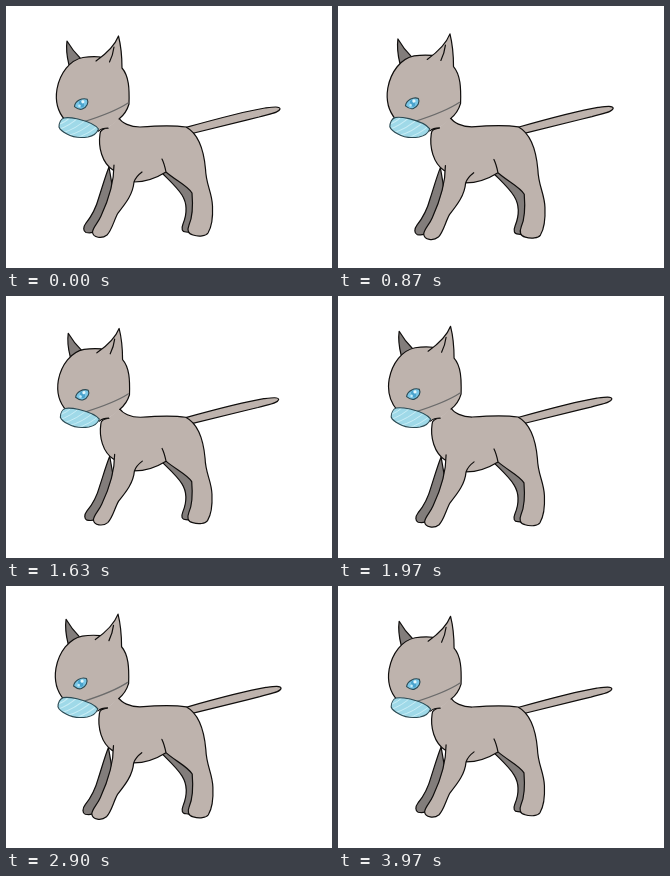
Recreate the animation shown at these times as an HTML page. Size 326x262 px, loop 4010 ms.

```html
<!DOCTYPE html>
<html lang="en">
<head>
<meta charset="utf-8">
<title>Breathing cat</title>
<style>
  html, body { margin: 0; width: 100%; height: 100%; overflow: hidden; background: #fff; }
  svg { display: block; width: 326px; height: 262px; }
  .line { fill: none; stroke: #100e0d; stroke-width: 1.2; stroke-linecap: round; stroke-linejoin: round; }
  .fur { fill: #beb3ad; }
  .shade { fill: #827d7b; }
  .strap { stroke: #6b6b6b; }
  .mask { fill: #9fd9e8; }
  .rim { stroke: #2c4a53; stroke-width: 1.1; }
  .stripes { fill: none; stroke: #c9edf5; stroke-width: 1; }
</style>
</head>
<body>
<svg viewBox="0 0 326 262">
  <defs>
    <path id="maskShape" d="M53 121C53 117 55 113 58 112C62 111 67 112 72 113C80 115 89 118 92.5 123C91 127 87 130 82 131C75 132 66 131 61 128C57 126 54 124 53 121Z"/>
    <clipPath id="maskClip"><use href="#maskShape"/></clipPath>
  </defs>
  <g id="cat">
    <!-- far legs and ear -->
    <path class="line shade" d="M103 161C99 171 96 182 93 191C90 202 85 211 80 217C77 221 77 225 80 226.500C83 227 87 227 89 225L108 190Z"/>
    <path class="line shade" d="M155 166C164 175 171 181 176 189C181 197 181 208 177 218C175 223 176 226 180 226L188 227L190 188L166 160Z"/>
    <path class="line shade" d="M63 59C61 51 60 42 61 35C65 42 69 47 75 53Z"/>

    <!-- tail -->
    <path class="line fur" d="M178 122C203 115 235 106 259 102C267 101 274 100 274 103C273 107 263 108 253 111C229 117 204 123 184 128Z"/>

    <!-- body and near legs -->
    <path class="fur" d="M102 122C97 123 94 124 94 128C92 141 96 157 107 164C108 179 102 195 95 210C92 217 87 221 86.500 226C87 232 96 233 101 229C106 224 108 214 112 207C120 197 127 188 128 176C140 176 152 171 160 166C169 174 182 180 186 187C187 199 187 210 183 219C181 224 182 228 187 229C193 231 200 230 202 227C205 222 207 211 206.500 200C206 186 200 179 199.500 163C198 146 193 128 180 121C167 119 147 120 134 121C124 121 116 117 113 112Z"/>
    <path class="line" d="M102 122C97 123 94 124 94 128C92 141 96 157 107 164M108 159C108 179 102 195 95 210C92 217 87 221 86.500 226C87 232 96 233 101 229C106 224 108 214 112 207C120 197 127 188 128 176M136 166C132 169 129 173 128 176C140 176 152 171 160 166M156 153C158 157 159 161 160 166C169 174 182 180 186 187C187 199 187 210 183 219C181 224 182 228 187 229C193 231 200 230 202 227C205 222 207 211 206.500 200C206 186 200 179 199.500 163C198 146 193 128 180 121C167 119 147 120 134 121C124 121 116 117 113 112"/>

    <!-- head -->
    <path class="fur" d="M59 114C52 106 49 95 51 83C54 67 64 54 77 51.500C84 50.500 89 50.500 95 51C102 46 109 39 112.500 30C115 40 116 51 116 62C123 70 123.500 83 123 98C121 105 118 109 113 113L102 122L90 124Z"/>
    <path class="line" d="M59 114C52 106 49 95 51 83C54 67 64 54 77 51.500C84 50.500 89 50.500 95 51M90 55C100 48 109 39 112.500 30C115 40 116 51 116 62C123 70 123.500 83 123 98C121 105 118 109 113 113M108 41Q107 49 103.500 56"/>
    <path class="line strap" d="M77 116C93 111 110 105 122 97"/>

    <!-- mask -->
    <use class="mask" href="#maskShape"/>
    <path class="stripes" clip-path="url(#maskClip)" d="M50 119Q60 117 66 109M51 124Q64 120 74 110M56 127Q70 123 82 112M61 130Q76 126 88 115M69 132Q82 129 94 118"/>
    <use class="line rim" href="#maskShape"/>
    <path class="line" d="M92.500 125Q96 122 102 122"/>

    <!-- eye -->
    <g transform="translate(75.5 98) rotate(-20)">
      <path class="line rim" style="fill:#79c6e6" d="M-7.500 0C-5 -5 3 -6 7 -2.500C7.500 1 4 5 -1 5C-4 5 -6 2.500 -7.500 0Z"/>
      <ellipse cx="0" rx="2.3" ry="3.500" fill="#4aa3cd"/>
      <circle cx="2" cy="-1.600" r="1.600" fill="#e4f8fd"/>
      <circle cx="-2.500" cy="1" r="1.300" fill="#c4ecf8"/>
    </g>
  </g>
</svg>
<script>
  const cat = document.getElementById('cat');
  const LOOP = 4010, STEP = 100 / 3, STEPS = 120, BREATH = 60;
  const PEAK = 16.5, REST = 0.42;
  const CX = 163, CY = 130.5;
  const start = performance.now();

  function draw(now) {
    const t = Math.max(0, now - start) % LOOP;
    const step = Math.min(STEPS - 1, Math.floor((t + 4) / STEP));
    const swell = 0.5 + 0.5 * Math.cos(2 * Math.PI * (step - PEAK) / BREATH) - REST;
    const sx = 1 + 0.03 * swell, sy = 1 + 0.06 * swell;
    cat.setAttribute('transform',
      `translate(${CX} ${CY}) scale(${sx} ${sy}) translate(${-CX} ${-CY})`);
    requestAnimationFrame(draw);
  }
  draw(start);
</script>
</body>
</html>
```
